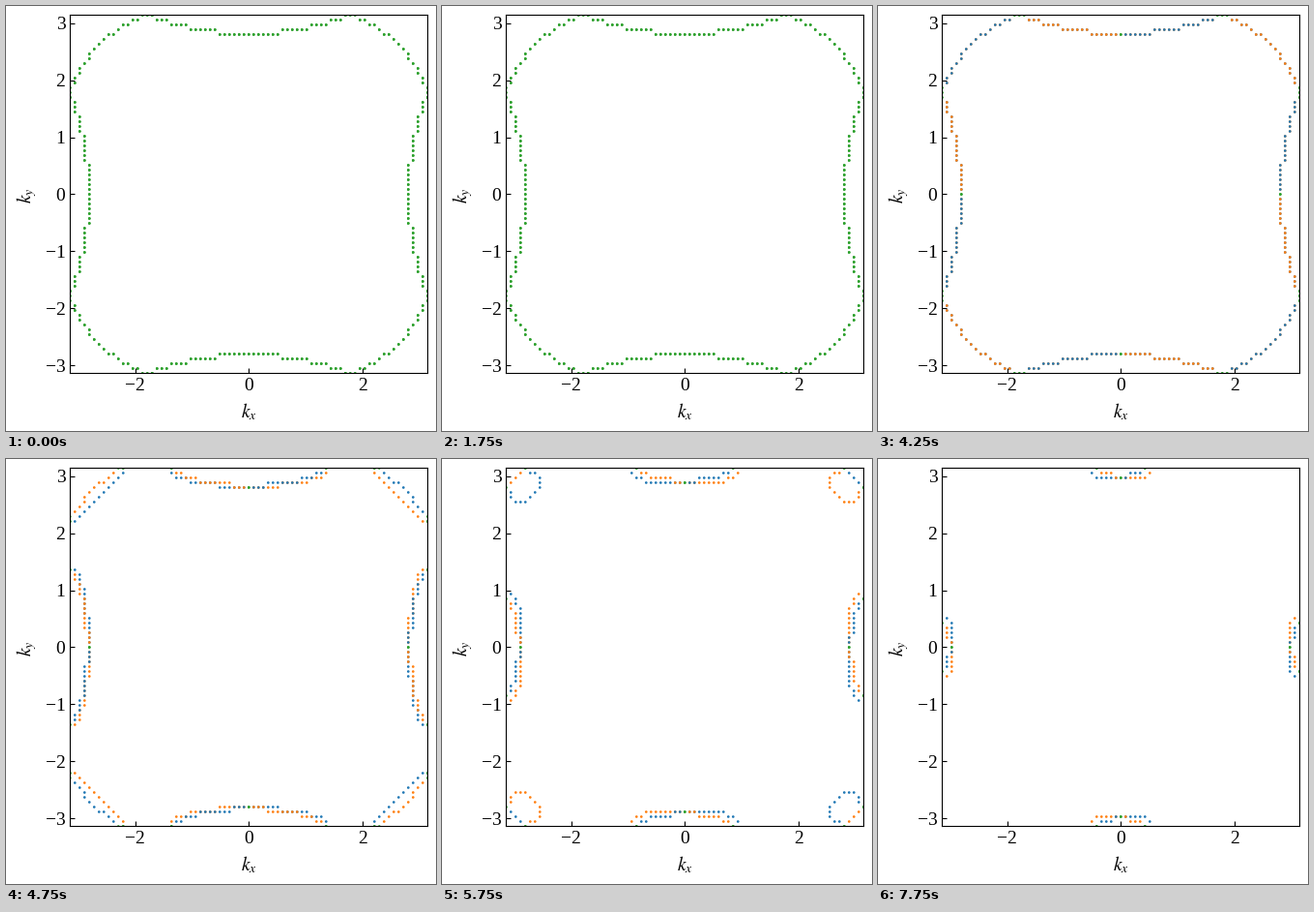
A matplotlib script that plays this animation: 445x439 px, repeating every 8000 ms.

```python
import numpy as np
import matplotlib.pyplot as plt
from matplotlib.animation import FuncAnimation

W, H, DPI = 445, 439, 100
FRAMES, STEP = 32, 250
BLUE, ORANGE, GREEN = "#1f77b4", "#ff7f0e", "#2ca02c"

plt.rcParams.update({
    "font.family": "Liberation Serif",
    "mathtext.fontset": "stix",
    "font.size": 14,
})

# momentum grid of a two-sublattice square lattice
k = np.linspace(-np.pi, np.pi, 75)
KX, KY = np.meshgrid(k, k)
HOP = 4 * np.cos(KX / 2) * np.cos(KY / 2)
DIAG = 0.48 * (np.cos(KX) + np.cos(KY))
SS = np.sin(KX) * np.sin(KY)
NODE = np.abs(SS) < 1e-9


def moment(n):
    """Staggered moment: zero, a faint seed, then a square-root onset."""
    if n < 8:
        return 0.0
    return max(0.002 * (n - 7), np.sqrt(0.0264 * max(n - 17.5, 0)))


def level(m):
    return np.interp(m, [0, 0.304, 0.465, 0.6], [0.54, 0.575, 0.4995, 0.64])


def edge(energy):
    """Occupied cells that touch an empty one."""
    full = energy < 0
    p = np.pad(full, 1, mode="edge")
    inner = p[:-2, 1:-1] & p[2:, 1:-1] & p[1:-1, :-2] & p[1:-1, 2:]
    return full & ~inner


def surface(n):
    m = moment(n)
    base = DIAG + level(m)
    split = min(0.9, 2.1 * m) * np.abs(SS)
    low, high = np.hypot(HOP, m - split), np.hypot(HOP, m + split)
    bands = [(base + high, 1), (base + low, -1),
             (base - low, -1), (base - high, 1)]
    points, colors = [], []
    for energy, spin in bands:
        on = edge(energy)
        points.append(np.column_stack([KX[on], KY[on]]))
        tint = np.where(spin * SS > 0, BLUE, ORANGE)
        tint[NODE | (m == 0)] = GREEN
        colors.extend(tint[on])
    return np.vstack(points), colors


# the small margin keeps the pixel size from rounding down
fig = plt.figure(figsize=((W + 0.01) / DPI, (H + 0.01) / DPI), dpi=DPI,
                 facecolor="white")
ax = fig.add_axes([66.3 / W, (H - 379.5) / H, 370 / W, 370 / H])
ax.set_xlim(-np.pi, np.pi)
ax.set_ylim(-np.pi, np.pi)
ax.set_xticks([-2, 0, 2])
ax.set_yticks(range(-3, 4))
ax.tick_params(direction="in")
fig.text(251.5 / W, 1 - 419 / H, "$k_x$", ha="center", va="center")
fig.text(21.5 / W, 1 - 195.5 / H, "$k_y$", ha="center", va="center", rotation=90)
dots = ax.scatter([], [], s=3.7, linewidths=0)


def draw(n):
    points, colors = surface(n)
    dots.set_offsets(points)
    dots.set_facecolor(colors)
    return (dots,)


anim = FuncAnimation(fig, draw, frames=FRAMES, interval=STEP,
                     init_func=lambda: draw(0), repeat=True, repeat_delay=0)
plt.show()
```
